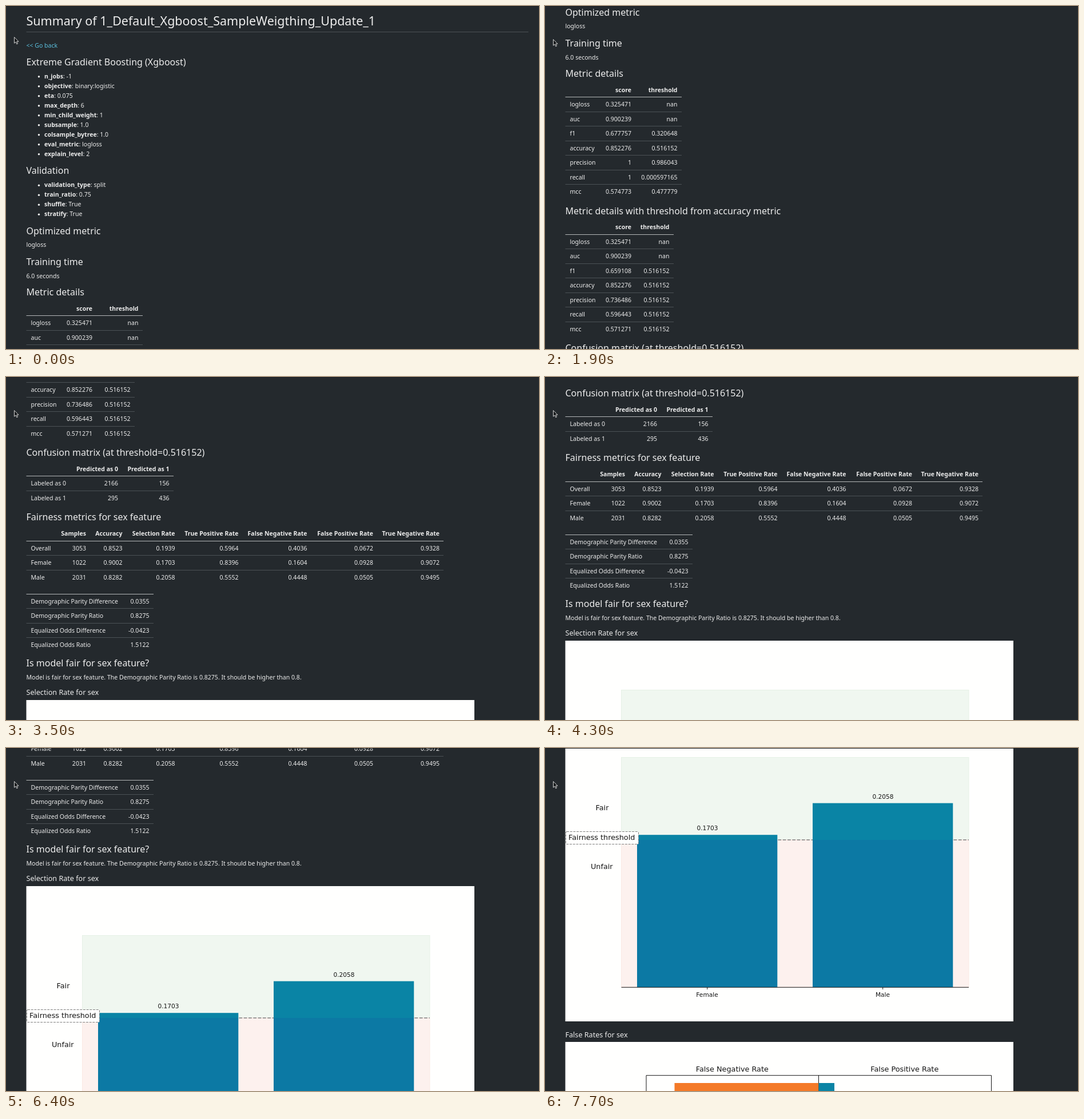
Recreate the animation shown at these times as an HTML page. Size 932 by 601 pixels, loop 8 s.

```html
<!DOCTYPE html>
<html lang="en">
<head>
<meta charset="utf-8">
<title>Model summary</title>
<style>
  html, body { margin: 0; width: 100%; height: 100%; overflow: hidden; background: #24292d; }
  svg { display: block; width: 932px; height: 601px; }
  text { font: 10.55px "Noto Sans", "Open Sans", sans-serif; fill: #ededed; white-space: pre; }
  .bold { font-weight: 700; }
  .plot { font-family: "DejaVu Sans", sans-serif; fill: #151515; }
</style>
</head>
<body>
<svg viewBox="0 0 932 601">
  <g id="page"></g>
  <rect width="932" height="1" fill="#191d20"/>
  <path id="mouse" d="M14.5 54.6v10.6l2.5-2.3 1.8 3.9 1.7-.8-1.7-3.7h3.2z" fill="#17191b" stroke="#e4e4e4" stroke-width=".9"/>
</svg>
<script>
const page = document.getElementById('page');
const mouse = document.getElementById('mouse');
const TEAL = '#0a84a5', BLUE = '#0c79a4', INK = '#151515';

function add(tag, attrs, content = '') {
  const el = document.createElementNS('http://www.w3.org/2000/svg', tag);
  for (const key in attrs) el.setAttribute(key, attrs[key]);
  el.innerHTML = content;
  page.append(el);
  return el;
}

// y is the middle of the capital letters
function text(x, y, content, size = 10.55, attrs = {}) {
  const el = add('text', { x, y: y + size * 0.36, ...attrs }, content);
  el.style.fontSize = size + 'px';
  return el;
}
const heading = (y, content) => text(35.5, y, content, 16);
const subheading = (y, content) => text(35.5, y, content, 12.6);
const box = (x, y, right, bottom, fill) =>
  add('rect', { x, y, width: right - x, height: bottom - y, fill });
const line = (x1, y1, x2, y2, attrs) =>
  add('path', { d: `M${x1} ${y1}L${x2} ${y2}`, fill: 'none', stroke: INK, ...attrs });
const label = (x, y, content, size) =>
  text(x, y, content, size, { class: 'plot', 'text-anchor': 'middle' });

function list(y, items) {
  items.split('|').forEach((item, i) => {
    const [name, value] = item.split('=');
    add('circle', { cx: 57.5, cy: y + i * 17 + 0.8, r: 1.7, fill: '#ededed' });
    text(67, y + i * 17, `<tspan class="bold">${name}</tspan>: ${value}`);
  });
}

// top is the rule under the header; columns are right edges of the cells
function table(top, width, columns, header, rows) {
  const end = { 'text-anchor': 'end' };
  header.forEach((name, i) => text(columns[i], top - 12.5, name, 10.5, { ...end, class: 'bold' }));
  rows.forEach((row, r) => {
    const [name, ...cells] = row.split('|');
    const y = top + 25.5 * r;
    box(35.5, Math.floor(y), width, Math.floor(y) + 1, r ? '#4b5155' : '#b4b7b8');
    text(43.5, y + 13, name);
    cells.forEach((cell, i) => text(columns[i], y + 13, cell, 10.55, end));
  });
}

text(35.5, 26, 'Summary of 1_Default_Xgboost_SampleWeigthing_Update_1', 21.5);
box(35.5, 45, 913.5, 46, '#4b5155');
text(35.5, 69.5, '&lt;&lt; Go back').style.fill = '#5bc0de';
heading(98, 'Extreme Gradient Boosting (Xgboost)');
list(123, 'n_jobs=-1|objective=binary:logistic|eta=0.075|max_depth=6|min_child_weight=1|' +
  'subsample=1.0|colsample_bytree=1.0|eval_metric=logloss|explain_level=2');
heading(288.5, 'Validation');
list(313.5, 'validation_type=split|train_ratio=0.75|shuffle=True|stratify=True');
heading(394, 'Optimized metric');
text(35.5, 418.5, 'logloss');
heading(448, 'Training time');
text(35.5, 473, '6.0 seconds');

heading(501.5, 'Metric details');
table(542.5, 239, [151, 231.5], ['score', 'threshold'], [
  'logloss|0.325471|nan', 'auc|0.900239|nan', 'f1|0.677757|0.320648',
  'accuracy|0.852276|0.516152', 'precision|1|0.986043',
  'recall|1|0.000597165', 'mcc|0.574773|0.477779']);
heading(742, 'Metric details with threshold from accuracy metric');
table(783, 225, [151, 217.5], ['score', 'threshold'], [
  'logloss|0.325471|nan', 'auc|0.900239|nan', 'f1|0.659108|0.516152',
  'accuracy|0.852276|0.516152', 'precision|0.736486|0.516152',
  'recall|0.596443|0.516152', 'mcc|0.571271|0.516152']);
heading(982.5, 'Confusion matrix (at threshold=0.516152)');
table(1023.5, 293, [196, 285.5], ['Predicted as 0', 'Predicted as 1'],
  ['Labeled as 0|2166|156', 'Labeled as 1|295|436']);
heading(1095.5, 'Fairness metrics for sex feature');
table(1137, 765, [140, 203.5, 295.5, 406.5, 526.5, 642, 758],
  ['Samples', 'Accuracy', 'Selection Rate', 'True Positive Rate',
    'False Negative Rate', 'False Positive Rate', 'True Negative Rate'], [
  'Overall|3053|0.8523|0.1939|0.5964|0.4036|0.0672|0.9328',
  'Female|1022|0.9002|0.1703|0.8396|0.1604|0.0928|0.9072',
  'Male|2031|0.8282|0.2058|0.5552|0.4448|0.0505|0.9495']);
table(1230, 258, [250.5], [], [
  'Demographic Parity Difference|0.0355', 'Demographic Parity Ratio|0.8275',
  'Equalized Odds Difference|-0.0423', 'Equalized Odds Ratio|1.5122']);
heading(1351.5, 'Is model fair for sex feature?');
text(35.5, 1376.5, 'Model is fair for sex feature. The Demographic Parity Ratio is 0.8275. It should be higher than 0.8.');

// Selection rate chart
subheading(1402.5, 'Selection Rate for sex');
box(35.5, 1416, 819, 1965, '#fffffe');
box(133.5, 1502.5, 741, 1647, '#f0f7f0').setAttribute('stroke', '#e6f1e6');
box(133.5, 1647, 741, 1905, '#fdf1ee').setAttribute('stroke', '#fbe9e5');
line(133.5, 1647, 741, 1647, { stroke: '#808080', 'stroke-width': 1.6, 'stroke-dasharray': '5.8 2.5' });
for (const [x, top, value, name] of [[161, 1638.2, '0.1703', 'Female'], [468, 1582.6, '0.2058', 'Male']]) {
  const middle = x + 122.7;
  box(x, top, x + 245.3, 1647, TEAL);
  box(x, 1647, x + 245.3, 1905, BLUE);
  line(middle, 1905, middle, 1909);
  label(middle + 0.3, top - 11.8, value, 10.6);
  label(middle - 0.2, 1918, name, 10.6);
}
line(133.5, 1905.3, 741, 1905.3);
label(100, 1590.7, 'Fair', 12.8);
label(99.3, 1693.7, 'Unfair', 12.8);
add('rect', { x: 36.5, y: 1632.5, width: 127, height: 22, rx: 1.5, fill: '#fffffe',
  stroke: '#808080', 'stroke-dasharray': '4 1.7' });
label(99.2, 1642, 'Fairness threshold', 12.8);

// False rates chart
subheading(1988, 'False Rates for sex');
box(35.5, 2001, 819, 2550, '#fffffe');
label(327.3, 2048.7, 'False Negative Rate', 12.8);
label(628.8, 2048.7, 'False Positive Rate', 12.8);
line(177, 2059.7, 780.5, 2059.7);
for (const x of [177, 478.5, 780.5]) line(x, 2059.7, x, 2500);
box(226.5, 2073, 478.5, 2250, '#f47a28');
box(478.5, 2073, 506, 2250, TEAL);

// [start ms, number of 100 ms steps, scroll position reached]
const scrolls = [
  [800, 4, 150], [1300, 5, 362], [1900, 5, 564], [2500, 1, 572], [2700, 6, 814],
  [3400, 6, 952], [4200, 2, 954], [4400, 2, 971], [4900, 2, 988], [5200, 4, 1040],
  [5800, 4, 1164], [6400, 7, 1352], [7300, 5, 1486]];

const progress = (t, start, steps) =>
  Math.max(0, Math.min(steps, Math.floor((t - start) / 100) + 1)) / steps;

function scrollAt(t) {
  let y = 0;
  for (const [start, steps, end] of scrolls) {
    const p = progress(t, start, steps);
    y += (end - y) * p * p * (3 - 2 * p);
    if (p < 1) break;
  }
  return Math.round(y);
}

function draw() {
  const t = performance.now() % 8000;
  page.setAttribute('transform', `translate(0 ${-scrollAt(t)})`);
  mouse.setAttribute('transform', `translate(0 ${4 * progress(t, 100, 4)})`);
  requestAnimationFrame(draw);
}
draw();
</script>
</body>
</html>
```
